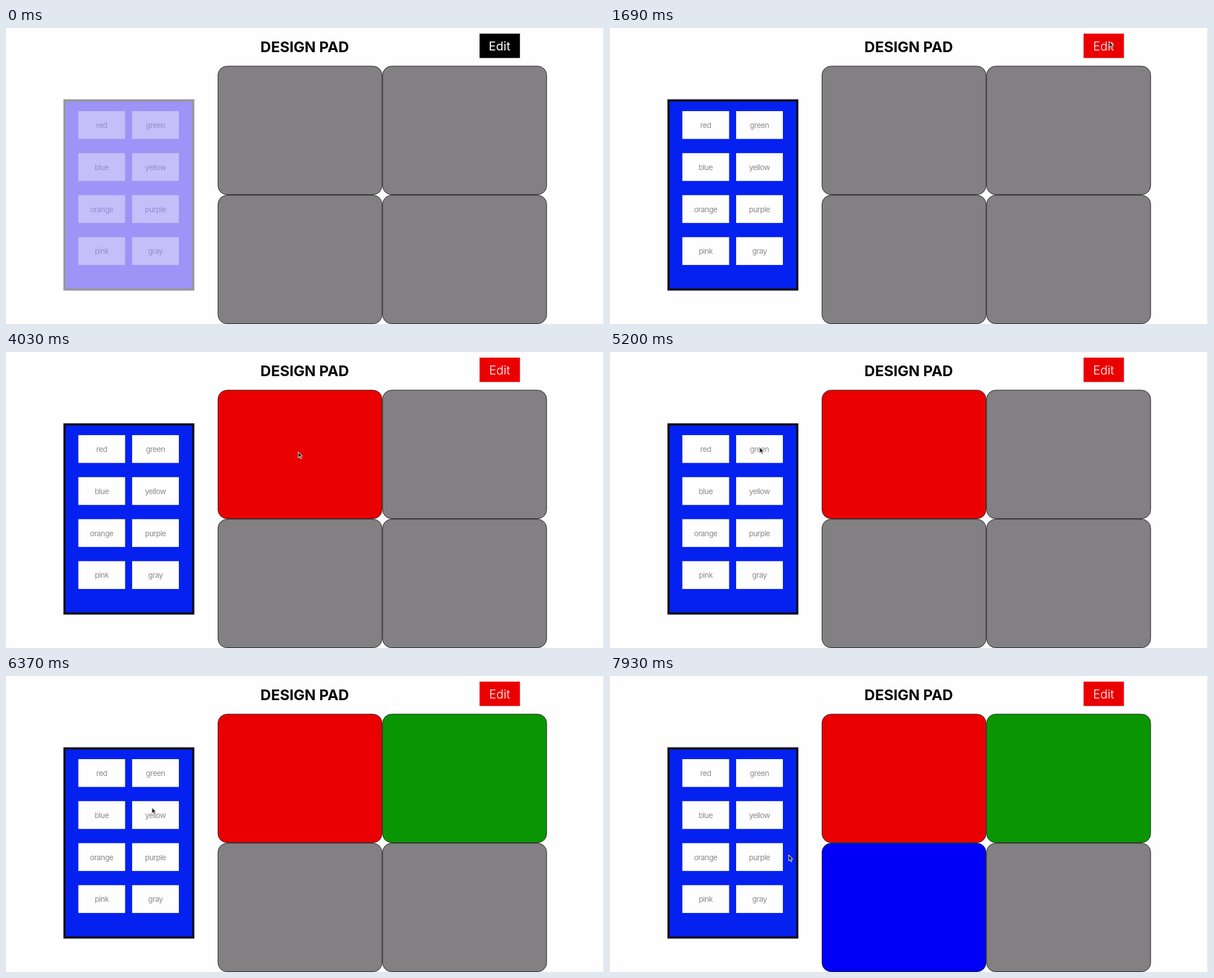
An HTML page with a canvas for the animation above (8000 ms loop, 1062 px wide and 527 px high).

```html
<!DOCTYPE html>
<html lang="en">
<head>
<meta charset="utf-8">
<title>Design pad</title>
<style>
html, body { margin: 0; width: 100%; height: 100%; overflow: hidden; background: #fefefe; }
canvas { display: block; }
</style>
</head>
<body>
<canvas id="stage" width="1062" height="527"></canvas>
<script>
const ctx = document.getElementById('stage').getContext('2d');
const LOOP = 8000;
const STEP = 130;
const EDIT_AT = 1430;
const PAPER = '#fefefe';
const GRAY = '#828082';
const CELL = { w: 292.3, h: 229.8 };
const NAMES = ['red', 'green', 'blue', 'yellow', 'orange', 'purple', 'pink', 'gray'];

// Each drop paints the next cell; the pointer is hidden during the drag.
const DROPS = [
  { at: 4030, fill: '#ea0000' },
  { at: 5720, fill: '#0a9604' },
  { at: 7670, fill: '#0000fa' }
];

const ENTRY = { x: 560, y: 4 };
const glide = (from, to, x, y) => ({ from, to, x, y });

// The pointer rests between moves.
const MOVES = [
  glide(130, 650, 120, 180),
  glide(910, 1690, 886, 23.5),
  glide(1820, 3250, 177.5, 168),
  glide(4030, 4680, 265, 169),
  glide(5720, 6760, 168, 243),
  glide(7670, 7930, 316.5, 318)
];
const jumps = DROPS.map(({ at }, i) => {
  const c = cellOrigin(i);
  return glide(at, at, c.x + CELL.w / 2 - 4, c.y + CELL.h / 2 - 5);
});
const PATH = [...MOVES, ...jumps].sort((a, b) => a.from - b.from || a.to - b.to);

function cellOrigin(i) {
  return { x: 376 + (i % 2) * CELL.w, y: 67.4 + Math.floor(i / 2) * CELL.h };
}

function pointerAt(t) {
  let { x, y } = ENTRY;
  for (const m of PATH) {
    if (t < m.from) break;
    const k = m.to > m.from ? Math.min(1, (t - m.from) / (m.to - m.from)) : 1;
    const e = 1 - (1 - k) ** 2;
    x += (m.x - x) * e;
    y += (m.y - y) * e;
  }
  return { x, y };
}

function rect(x, y, w, h, color) {
  ctx.fillStyle = color;
  ctx.fillRect(x, y, w, h);
}

function label(text, x, y, size, weight, color, spacing = 0) {
  ctx.font = `${weight} ${size}px Inter, Roboto, sans-serif`;
  ctx.letterSpacing = spacing + 'px';
  ctx.textAlign = 'center';
  ctx.fillStyle = color;
  ctx.fillText(text, x + spacing / 2, y);
}

function drawPanel(active) {
  rect(102, 127, 232.5, 340.5, active ? '#0d101c' : '#99979d');
  rect(106, 131, 224.5, 332.5, active ? '#0521f0' : '#9c94f6');
  NAMES.forEach((name, i) => {
    const x = 128.5 + (i % 2) * 95.5;
    const y = 148 + Math.floor(i / 2) * 74.8;
    rect(x, y, 83, 49.5, active ? PAPER : '#c4bff9');
    label(name, x + 41.7, y + 30, 13.3, 400, active ? '#8b888d' : '#948bce', -0.5);
  });
}

function drawCell(i, t) {
  const { x, y } = cellOrigin(i);
  const drop = DROPS[i];
  ctx.beginPath();
  ctx.roundRect(x + 0.5, y + 0.5, CELL.w - 1, CELL.h - 1, 16);
  ctx.fillStyle = drop && t >= drop.at ? drop.fill : GRAY;
  ctx.fill();
  ctx.strokeStyle = '#1c1c1c';
  ctx.lineWidth = 1;
  ctx.stroke();
}

function drawPointer({ x, y }) {
  ctx.save();
  ctx.translate(x + 0.8, y + 0.5);
  const arrow = new Path2D('M0 0V10.5L2.4 8.4L4.2 12.2L5.8 11.5L4.2 7.8L7.2 7.4Z');
  ctx.fillStyle = '#161616';
  ctx.fill(arrow);
  ctx.lineJoin = 'round';
  ctx.lineWidth = 1.1;
  ctx.strokeStyle = '#d0d0d0';
  ctx.stroke(arrow);
  ctx.restore();
}

function draw(t) {
  const active = t >= EDIT_AT;
  rect(0, 0, 1062, 527, PAPER);
  rect(1061, 0, 1, 527, '#dedede');
  label('DESIGN PAD', 530.5, 43, 26, 700, '#050505');
  rect(841, 10, 71.7, 43.4, active ? '#ea0000' : '#000');
  label('Edit', 876.5, 40, 21.5, active ? 300 : 400, PAPER);
  drawPanel(active);
  for (let i = 0; i < 4; i++) drawCell(i, t);
  if (t >= PATH[0].from) drawPointer(pointerAt(t));
}

const start = performance.now();

function tick() {
  const t = (performance.now() - start) % LOOP;
  draw(Math.floor(t / STEP) * STEP);
  requestAnimationFrame(tick);
}

tick();
</script>
</body>
</html>
```
